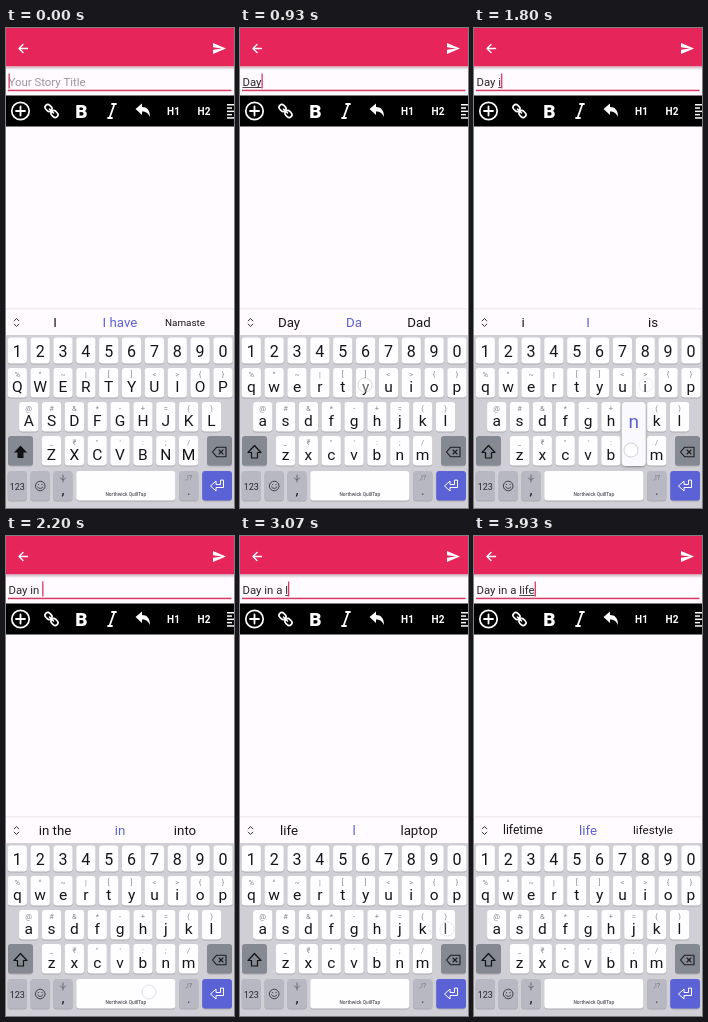
Recreate the animation shown at these times as an HTML page with a canvas. Size 228 px wide and 480 px high, loop 4.07 s.

```html
<!DOCTYPE html>
<html lang="en">
<head>
<meta charset="utf-8">
<title>Typing a story title</title>
<style>
html, body { margin: 0; width: 100%; height: 100%; overflow: hidden; background: #fffbff; }
canvas { display: block; width: 228px; height: 480px; }
</style>
</head>
<body>
<canvas id="stage"></canvas>
<script>
const canvas = document.getElementById('stage');
const c = canvas.getContext('2d');
const dpr = window.devicePixelRatio || 1;
canvas.width = 228 * dpr;
canvas.height = 480 * dpr;

const LOOP = 4070, SUGGEST_LAG = 80, FADE = 220;
const PINK = '#e6255a', INK = '#161619', ACCENT = '#5c62d2';
const PITCH = 22.85;

// Letters, long-press hints, first key centre, top of each row
const rows = [
  ['qwertyuiop', '%^~|[]<>{}', 11.3, 340],
  ['asdfghjkl', '@#&*-+=()', 22.7, 374],
  ['zxcvbnm', '_₹"\':;/', 45.5, 408]
];
const keys = {};
rows.forEach(([letters, hints, x, y]) => [...letters].forEach((ch, i) => {
  keys[ch] = { ch, hint: hints[i], x: x + i * PITCH, y };
}));

// Character, finger down, finger up, touch point, suggestions afterwards
const presses = [
  ['D', 230, 470, 69, 391, 'Do|D|Did'],
  ['a', 490, 620, 14, 388, 'Day|Da|Dad'],
  ['y', 770, 900, 125, 357, 'Days|Day|Daily'],
  [' ', 1000, 1115, 139, 454, 'and|after|to'],
  ['i', 1540, 1670, 172, 357, 'i|I|is'],
  ['n', 1740, 1870, 157, 422, 'in the|in|into'],
  [' ', 2000, 2130, 143, 456, 'the|a|my'],
  ['a', 2270, 2400, 20, 390, 'and|a|a row'],
  [' ', 2460, 2590, 148, 458, 'row|few|day'],
  ['l', 2860, 2980, 207, 393, 'life|l|laptop'],
  ['i', 3200, 3330, 173, 358, 'like|li|life'],
  ['f', 3390, 3510, 91, 390, 'life|lif|lift'],
  ['e', 3590, 3715, 57, 358, 'lifetime|life|lifestyle']
].map(([ch, down, up, x, y, words]) => ({ ch, down, up, x, y, words }));

function font(size, weight = 400) {
  c.font = `${weight} ${size}px Roboto, sans-serif`;
}

function text(str, x, y, size, color = INK, align = 'center', weight = 400) {
  font(size, weight);
  c.textAlign = align;
  c.fillStyle = color;
  c.fillText(str, x, y);
}

function rect(x, y, w, h, color) {
  c.fillStyle = color;
  c.fillRect(x, y, w, h);
}

function key(x, y, w, h, color = '#fefdff') {
  c.fillStyle = '#a9a9b0';
  c.beginPath();
  c.roundRect(x, y + 1, w, h, 3);
  c.fill();
  c.fillStyle = color;
  c.beginPath();
  c.roundRect(x, y, w, h, 3);
  c.fill();
}

function icon(x, y, path, color, width = 0) {
  c.save();
  c.translate(x, y);
  const shape = new Path2D(path);
  if (width) {
    c.strokeStyle = color;
    c.lineWidth = width;
    c.lineJoin = c.lineCap = 'round';
    c.stroke(shape);
  } else {
    c.fillStyle = color;
    c.fill(shape);
  }
  c.restore();
}

function circle(x, y, r) {
  c.beginPath();
  c.arc(x, y, r, 0, Math.PI * 2);
}

function drawHeader() {
  rect(0, 0, 228, 38.5, PINK);
  const shade = c.createLinearGradient(0, 38.5, 0, 42);
  shade.addColorStop(0, '#c8b4bf');
  shade.addColorStop(1, '#fffbff');
  rect(0, 38.5, 228, 3.5, shade);
  icon(17, 20.5, 'M4.5 0H-4M0-4L-4 0L0 4', '#fff', 1.4);
  icon(213, 20.5, 'M-6-5.5L7 0L-6 5.5V1.3L3 0L-6-1.3Z', '#fff');
}

function drawTitle(typed, sinceKey) {
  const left = 2.5;
  if (!typed) text('Your Story Title', left, 57.5, 11.4, '#98959b', 'left');
  text(typed, left, 57.5, 11.4, '#29272b', 'left');
  const width = c.measureText(typed).width;
  const start = c.measureText(typed.slice(0, typed.lastIndexOf(' ') + 1)).width;
  if (width > start) rect(left + start, 59, width - start, 0.9, '#39363b');
  rect(2, 61.7, 223.5, 1.5, '#d93863');
  if (sinceKey % 1000 < 500) rect(left + width, 45.5, 1.3, 15, '#d93863');
}

function drawToolbar() {
  rect(0, 67.5, 228, 31, '#000');
  c.strokeStyle = '#fff';
  c.lineWidth = 1.7;
  circle(14.5, 83, 8.7);
  c.stroke();
  icon(14.5, 83, 'M-4.5 0H4.5M0-4.5V4.5', '#fff', 1.8);
  c.save();
  c.translate(45.5, 83);
  c.rotate(Math.PI / 4);
  c.lineWidth = 1.6;
  for (const x of [-8, 0.5]) {
    c.beginPath();
    c.roundRect(x, -2.8, 7.5, 5.6, 2.8);
    c.stroke();
  }
  c.restore();
  icon(45.5, 83, 'M-2-2L2 2', '#fff', 1.6);
  text('B', 75.5, 90, 19, '#fff', 'center', 900);
  icon(106, 83, 'M2.5-7L-2.5 7M0-7H4M-4 7H0', '#fff', 1.8);
  icon(137, 83, 'M-7.5-2L-1-7.5V-4C4-4 7-1 7 6C5 2 3 .5-1 .5V4Z', '#fff');
  text('H1', 167.5, 86.7, 10, '#fff', 'center', 700);
  text('H2', 198, 86.7, 10, '#fff', 'center', 700);
  for (let i = 0; i < 5; i++) rect(221, 76 + i * 3.3, i % 2 ? 5 : 7, 1.5, '#fff');
}

function drawSuggestions(words) {
  rect(0, 280.5, 228, 0.8, '#e2dfe6');
  icon(10.5, 294.5, 'M-2.3-1.6L0-4L2.3-1.6M-2.3 1.6L0 4L2.3 1.6', '#333', 1);
  words.split('|').forEach((word, i) => {
    font(13.3);
    const size = 13.3 * Math.min(1, 40 / c.measureText(word).width);
    text(word, 49 + i * 65, 294 + size * 0.36, size, i === 1 ? ACCENT : INK);
  });
}

function drawKeyboard(upper, spaceDown) {
  const dark = '#858991', mid = '#b7b8c1';
  rect(0, 307, 228, 173, '#d0cfd5');
  [...'1234567890'].forEach((digit, i) => {
    const x = 11.3 + i * PITCH;
    key(x - 9.6, 309.5, 19.2, 26);
    text(digit, x, 329, 16);
  });
  for (const { ch, hint, x, y } of Object.values(keys)) {
    key(x - 9.6, y, 19.2, 29.5);
    text(hint, x, y + 9, 7.5, '#88868e');
    text(upper ? ch.toUpperCase() : ch, x, y + 23.5, 15.5);
  }

  key(2, 408, 25, 29.5, dark);
  const arrow = 'M0-6.5L6.5.5H3V6H-3V.5H-6.5Z';
  icon(14.5, 424, arrow, '#111', upper ? 0 : 1.2);
  key(201, 408, 25, 29.5, dark);
  icon(213.5, 424, 'M-7 0L-3-4.7H6.5V4.7H-3ZM-.5-2L3.5 2M3.5-2L-.5 2', '#1c1c20', 1.1);

  for (const x of [1.7, 24.5, 47.4, 173.2]) key(x, 443, 19.2, 29.5, mid);
  text('123', 11.3, 461.5, 9, '#26262b');
  c.strokeStyle = '#36363b';
  c.lineWidth = 0.9;
  circle(34.2, 458, 4.8);
  c.stroke();
  icon(34.2, 458, 'M-2.6 1Q0 4.2 2.6 1M-1.8-1.6V-1.3M1.8-1.6V-1.3', '#36363b', 0.9);
  icon(57, 450, 'M0-3V.5M-2.5 0Q0 4 2.5 0M0 2V4', '#66666e', 1);
  text(',', 57, 466.5, 15);
  text(',!?', 182.8, 452, 7, '#77757e');
  text('.', 182.8, 466.5, 15, '#55545b');

  key(70.3, 443, 99, 29.5, spaceDown ? '#c6c6cd' : '#fefdff');
  text('Northwick QuillTap', 119.8, 468, 4.8, '#55535a', 'center', 500);
  key(196.2, 443, 29.8, 29.5, '#5b62d6');
  icon(211, 458, 'M6.5-5.5V1.5H-1V5L-6.5 0L-1-5V-1.5H3.5V-5.5Z', '#fff', 1);
}

function drawPopup(ch) {
  const { x, y } = keys[ch.toLowerCase()];
  c.save();
  c.shadowColor = 'rgba(0,0,0,.3)';
  c.shadowBlur = 3 * dpr;
  c.shadowOffsetY = dpr;
  c.fillStyle = '#faf9fd';
  c.beginPath();
  c.roundRect(x - 12, y - 34, 24, 64, 4);
  c.fill();
  c.restore();
  text(ch, x, y - 8.5, 19, ACCENT);
}

function drawTouch(press, t) {
  const { down, up, x, y } = press;
  if (t < down || t > up + FADE) return;
  const held = t < up;
  const alpha = held ? 1 : 1 - (t - up) / FADE;
  circle(x, y, 7);
  c.fillStyle = `rgba(255,255,255,${alpha * (held ? 0.8 : 0.4)})`;
  c.fill();
  c.strokeStyle = `rgba(100,100,110,${alpha * 0.35})`;
  c.lineWidth = 0.8;
  c.stroke();
}

function draw(t) {
  const done = presses.filter(p => t >= p.up);
  const held = presses.find(p => t >= p.down && t < p.up);
  const suggested = presses.filter(p => t >= p.up + SUGGEST_LAG).pop();
  const last = done[done.length - 1];

  c.setTransform(dpr, 0, 0, dpr, 0, 0);
  rect(0, 0, 228, 480, '#fffbff');
  drawHeader();
  drawTitle(done.map(p => p.ch).join(''), last ? t - last.up : t);
  drawToolbar();
  drawSuggestions(suggested ? suggested.words : 'I|I have|Namaste');
  drawKeyboard(!last, held && held.ch === ' ');
  if (held && held.ch !== ' ') drawPopup(held.ch);
  presses.forEach(p => drawTouch(p, t));
}

const start = performance.now();
function tick() {
  draw((performance.now() - start) % LOOP);
  requestAnimationFrame(tick);
}
tick();
</script>
</body>
</html>
```
